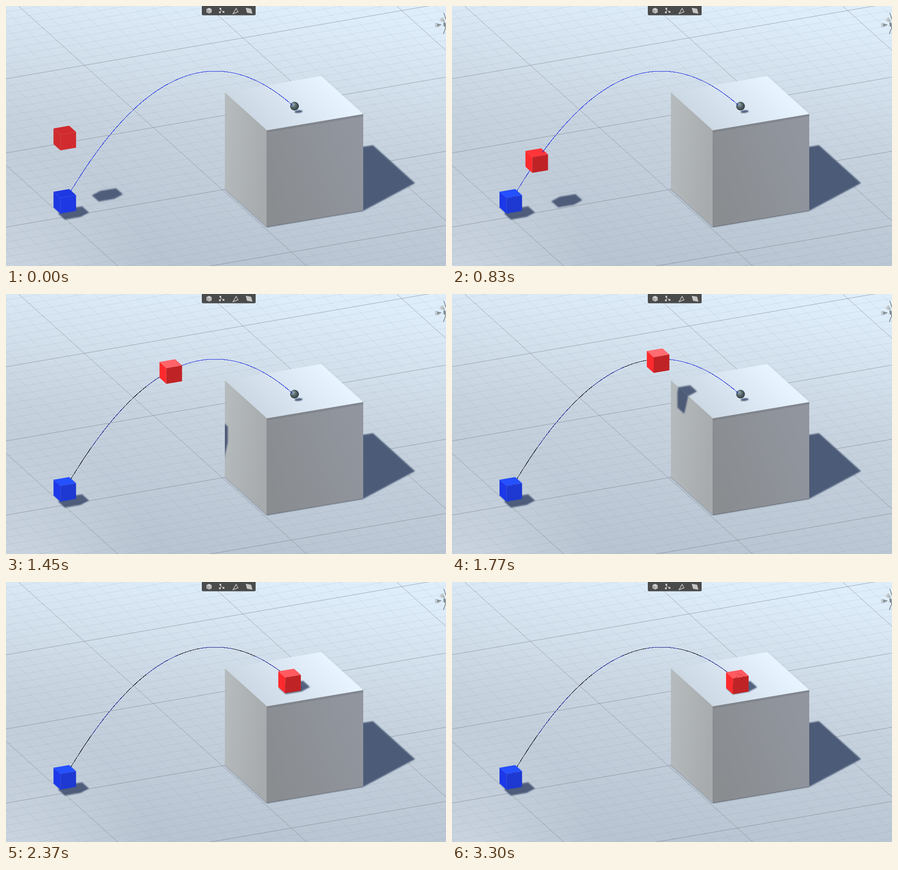
Animation of 973 by 575 pixels, one loop 3.33 s. Source, as an HTML page with a canvas:

```html
<!DOCTYPE html>
<html lang="en">
<head>
<meta charset="utf-8">
<title>Projectile arc</title>
<style>
  html, body { margin: 0; width: 100%; height: 100%; overflow: hidden; background: #c7d3df; }
  canvas { display: block; }
</style>
</head>
<body>
<canvas id="stage" width="973" height="575"></canvas>
<script>
const W = 973, H = 575, LOOP = 3330;
const PLAY = 250, LAUNCH = 630, SETTLED = 2900;
const SPEED = 0.2855, BEND = 0.002597;
const BLUE = { x: 130, y: 432 }, LANDING = { x: 631, y: 221 };

// Screen vectors of the big box's edges; LIGHT is the shadow drift per pixel of height
const A = [213, -36], B = [93, 84], UP = [0, -214], LIGHT = [0.535, -0.286];
const BOX = { x: 637, y: 322 }, BOX_HEIGHT = 214, CUBE = 0.163;
const SHADE = [LIGHT[0] * BOX_HEIGHT, LIGHT[1] * BOX_HEIGHT];
const SHADOW = 'rgba(62,78,110,.87)', ARC = '#1a28e0';

const view = document.getElementById('stage').getContext('2d');
const scale = (vectors, s) => vectors.map(v => v.map(n => n * s));

// Corners of the outline swept by vectors sorted by angle, around a centre
function sweep(x, y, vectors) {
  for (const [dx, dy] of vectors) { x -= dx / 2; y -= dy / 2; }
  const steps = [...vectors, ...scale(vectors, -1)];
  return steps.map(([dx, dy]) => [x += dx, y += dy]);
}

function poly(points) {
  const path = new Path2D();
  points.forEach(([x, y]) => path.lineTo(x, y));
  path.closePath();
  return path;
}

function fill(c, color, points) {
  c.fillStyle = color;
  c.fill(poly(points));
}

function line(c, color, x1, y1, x2, y2) {
  c.strokeStyle = color;
  c.beginPath();
  c.moveTo(x1, y1);
  c.lineTo(x2, y2);
  c.stroke();
}

function gradient(c, x1, y1, x2, y2, ...colors) {
  const g = c.createLinearGradient(x1, y1, x2, y2);
  colors.forEach((color, i) => g.addColorStop(i / (colors.length - 1), color));
  return g;
}

function layer(draw) {
  const canvas = document.createElement('canvas');
  canvas.width = W;
  canvas.height = H;
  draw(canvas.getContext('2d'));
  return canvas;
}

// Visible faces of a prism with edges a, b and u: top, left, front
function faces({ x, y }, [a, b, u]) {
  const beside = (v, sign) => [x + sign * v[0] / 2, y + sign * v[1] / 2];
  return [
    sweep(...beside(u, 1), [a, b]),
    sweep(...beside(a, -1), [u, b]),
    sweep(...beside(b, 1), [u, a]),
  ];
}

function drawPrism(c, centre, edges, colors) {
  faces(centre, edges).forEach((face, i) => fill(c, colors[i], face));
}

// One heavy ground line in every ten
function drawGrid(c) {
  for (let i = -60; i < 60; i++) {
    const color = i % 10 ? 'rgba(110,122,134,.14)' : 'rgba(112,120,126,.6)';
    const y = 161 + i * 16.4, x = 173 + i * 35.1, y0 = 131 - i * 6.05;
    line(c, color, 0, y, W, y - 0.1725 * W);
    line(c, color, x - 1500, y0 - 1353, x + 1500, y0 + 1353);
  }
}

const ground = layer(c => {
  c.fillStyle = gradient(c, 510, 0, 450, H, '#deedfa', '#c6d2de', '#b8c4d1');
  c.fillRect(0, 0, W, H);
  const glow = c.createRadialGradient(0, 640, 0, 0, 640, 330);
  glow.addColorStop(0, 'rgba(235,244,252,.4)');
  glow.addColorStop(1, 'rgba(235,244,252,0)');
  c.fillStyle = glow;
  c.fillRect(0, 0, W, H);
  drawGrid(c);
  c.filter = 'blur(1.8px)';
  const [x, y] = [BOX.x + SHADE[0] / 2, BOX.y + BOX_HEIGHT / 2 + SHADE[1] / 2];
  fill(c, '#4c5c78', sweep(x, y, [SHADE, A, B]));
});

const [boxTop, boxLeft, boxFront] = faces(BOX, [A, B, UP]);

const box = layer(c => {
  drawPrism(c, BOX, [A, B, UP], [
    gradient(c, 690, 155, 570, 275, '#e7f4ff', '#ccd8e3'),
    gradient(c, 484, 300, 577, 310, '#b5babc', '#a7abad'),
    gradient(c, 577, 420, 790, 340, '#898d90', '#91959e'),
  ]);
  c.lineWidth = 5;
  line(c, 'rgba(110,116,124,.4)', 577, 277.5, 790, 241.5);
  c.lineWidth = 1;
  line(c, 'rgba(80,88,100,.6)', 577, 488.5, 790, 452.5);
  line(c, 'rgba(90,98,108,.4)', 577, 275, 577, 488);
});

function drawCone(c, x, y, angle, color) {
  c.save();
  c.translate(x, y);
  c.rotate(angle);
  fill(c, color, [[0, -5], [13, 0], [0, 5]]);
  c.fillStyle = '#c6cdd2';
  c.beginPath();
  c.ellipse(0, 0, 2.5, 5, 0, 0, 7);
  c.fill();
  c.restore();
}

const overlay = layer(c => {
  const icon = '#c6c6c6';
  c.fillStyle = '#4a4b4b';
  c.beginPath();
  c.roundRect(433, -4, 119, 24.5, 3);
  c.fill();
  drawPrism(c, { x: 449, y: 10.5 }, [[6, -3], [6, 3], [0, -7]], ['#d0d0d0', '#a9a9a9', '#bdbdbd']);
  for (const [x, y] of [[474, 6], [473, 14], [481, 13]]) {
    line(c, icon, 475, 9, x, y);
    c.fillStyle = icon;
    c.fillRect(x - 2, y - 2, 4, 4);
  }
  c.lineWidth = 1.5;
  c.stroke(poly([[509, 5], [513, 13], [502, 17]]));
  fill(c, icon, [[530, 4], [542, 6], [545, 17], [533, 15]]);

  // Corner of the axis gizmo
  line(c, '#777f85', 967, 62, 973, 46);
  line(c, '#777f85', 968, 15, 973, 30);
  drawCone(c, 951, 42.5, -0.1, '#8b9399');
  drawCone(c, 963, 29, 0.7, '#b4bbc0');
  drawPrism(c, { x: 973, y: 40 }, [[7, -2], [4, 3], [0, -9]], ['#dfe4e7', '#7b838a', '#9aa2a8']);
});

const arcY = x => 144 + BEND * (x - 463) ** 2;

// Unsmoothed one-pixel curve
function plotArc(from, to, colorAt) {
  for (let x = from; x < to; x += 0.4) {
    view.fillStyle = colorAt(x);
    view.fillRect(Math.floor(x), Math.floor(arcY(x)), 1, 1);
  }
}

const trailColor = x => (x + 100) % 120 < 50 ? '#05050f' : '#11188c';

function redAt(t) {
  if (t < LAUNCH) {
    const fall = Math.max(0, t - PLAY);
    return { x: BLUE.x, y: 292 + BEND * (SPEED * fall) ** 2 };
  }
  const x = BLUE.x + SPEED * (t - LAUNCH);
  return x < LANDING.x ? { x, y: arcY(x) + 0.01 * (x - BLUE.x) } : LANDING;
}

// Cube shadow on the floor, or on a plane raised above it
function cubeShadow({ x, y }, raised = 0) {
  const floor = 468 - 0.03 * (x - BLUE.x) - raised, height = floor - y;
  return sweep(x + LIGHT[0] * height, floor + LIGHT[1] * height, scale([SHADE, A, B], CUBE));
}

// Moves a floor shadow point back along the light onto the box's left wall
function ontoWall([x, y]) {
  const [cornerX, cornerY] = [BOX.x - (A[0] + B[0]) / 2, BOX.y + (BOX_HEIGHT - A[1] - B[1]) / 2];
  const height = (B[1] * (x - cornerX) - B[0] * (y - cornerY)) / (B[1] * LIGHT[0] - B[0] * LIGHT[1]);
  return [x - LIGHT[0] * height, y - (LIGHT[1] + 1) * height];
}

function drawShadow(points, clip) {
  view.save();
  if (clip) view.clip(poly(clip));
  view.filter = 'blur(1.5px)';
  fill(view, SHADOW, points);
  view.restore();
}

function drawBall() {
  view.save();
  view.filter = 'blur(1.3px)';
  view.fillStyle = SHADOW;
  view.beginPath();
  view.ellipse(647, 233.5, 9, 3, -0.1, 0, 7);
  view.fill();
  view.restore();
  const shade = view.createRadialGradient(635, 217, 1, 637, 221, 11);
  shade.addColorStop(0, '#8fa5aa');
  shade.addColorStop(0.45, '#596b70');
  shade.addColorStop(1, '#2f393d');
  view.fillStyle = shade;
  view.beginPath();
  view.arc(638, 221.5, 9.7, 0, 7);
  view.fill();
}

function drawSpecks({ x, y }) {
  view.fillStyle = '#7c1519';
  for (let i = 1; i < 7; i++)
    view.fillRect(x - 24 + i * 37 % 40, y - 20 + i * 7 % 17, 1.5, 1.5);
}

function render(t) {
  const red = redAt(t), lit = t >= PLAY;
  const cubeEdges = scale([A, B, UP], CUBE);
  view.drawImage(ground, 0, 0);
  drawShadow(cubeShadow(BLUE));
  if (red.x < 540) drawShadow(cubeShadow(red));

  view.drawImage(box, 0, 0);
  if (red.x > 350) {
    drawShadow(cubeShadow(red, BOX_HEIGHT), boxTop);
    drawShadow(cubeShadow(red).map(ontoWall), boxLeft);
  }

  drawBall();
  plotArc(BLUE.x, 633, x => x < red.x && red.x > 200 ? trailColor(x) : ARC);

  const blueColors = lit ? ['#2450ff', '#1c38e8', '#1e39d2'] : Array(3).fill('#1e38e3');
  const gloss = 50 + 58 * Math.max(0, 1 - ((red.x - 470) / 290) ** 2);
  const redColors = lit ? [`rgb(255,${gloss},${gloss + 5})`, '#fd2a2d', '#c02326'] : Array(3).fill('#d12b2f');
  drawPrism(view, BLUE, cubeEdges, blueColors);
  drawPrism(view, red, cubeEdges, redColors);
  if (t >= LAUNCH && red.x < 330) plotArc(red.x + 13, red.x + 28, () => ARC);
  if (t > SETTLED) drawSpecks(red);
  view.drawImage(overlay, 0, 0);
}

const start = performance.now();
function tick() {
  render((performance.now() - start) % LOOP);
  requestAnimationFrame(tick);
}
tick();
</script>
</body>
</html>
```
